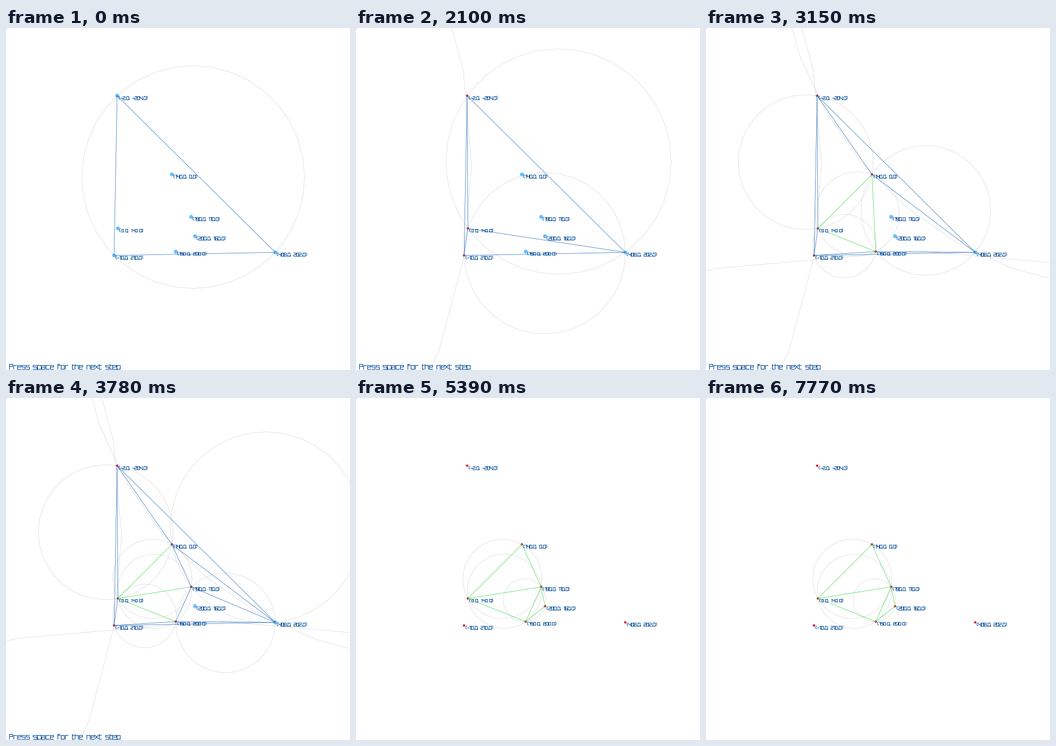
Write a matplotlib script that moves like this. It is 640 px wide and 636 px high and loops after 7840 ms.

```python
import numpy as np
import matplotlib.pyplot as plt
from matplotlib.animation import FuncAnimation
from matplotlib.collections import LineCollection

W, H, DPI = 640, 636, 100
PX = 72 / DPI                     # one pixel in points
FRAMES, STEP = 112, 70

SKY, RED = "#66bfff", "#e02434"
BLUE, GREEN, GRAY, INK = "#1a68ba", "#2cd83c", "#cccccc", "#004a98"

SCALE, ORIGIN = 0.7176, np.array([208.2, 272.3])
POINTS = {"A": (-2, -204), "B": (-10, 210), "C": (408, 202), "D": (0, 140),
          "E": (140, 0), "F": (150, 200), "G": (190, 110), "H": (200, 160)}
POS = {k: ORIGIN + SCALE * np.array(p) for k, p in POINTS.items()}

# Points are inserted from left to right; the last time drops the outer triangle.
ORDER = "BADEFGHC"
TIMES = [910, 1610, 2100, 2520, 3080, 3570, 4130, 4760, 5250]
FULL = "ABD ADE ACE BDF BCF DEG DFG CEG CGH CFH FGH"
MESHES = ["ABC", "ABC", "ABC",
          "ABD BCD ACD",
          "ABD BCD ADE CDE ACE",
          "ABD ADE ACE BDF BCF CEF DEF",
          "ABD ADE ACE BDF BCF DEG DFG CEG CFG",
          FULL, FULL,
          "DEG DFG FGH"]

# Segment font: strokes and advance of each character.
CAP, XH, GAP = 9, 6.4, 1.7
GLYPHS = {"0": ("abcdef", 7.7), "1": ("abc", 4.6), "2": ("abged", 7.7),
          "4": ("fgbc", 7.7), "5": ("afgcd", 7.7), "6": ("afgedc", 7.7),
          "8": ("abcdefg", 7.7), "9": ("abcdfg", 7.7), "-": ("g", 6.1),
          ".": ("k", 3.1), ",": ("q", 3.1), " ": ("", 6.1),
          "(": ("l", 4.6), ")": ("m", 4.6), "P": ("abgef", 8),
          "r": ("aef", 7), "e": ("abgfed", 8), "s": ("afgcd", 8),
          "p": ("abcdefj", 8), "a": ("abcdeg", 8), "c": ("afed", 8),
          "f": ("efuat", 6), "o": ("abcdef", 8), "t": ("efuad", 5.6),
          "h": ("abcefu", 8), "n": ("abcef", 8), "x": ("xy", 8)}


def strokes(w, h):
    m = h / 2
    return {"a": [(0, h), (w, h)], "b": [(w, h), (w, m)], "c": [(w, m), (w, 0)],
            "d": [(0, 0), (w, 0)], "e": [(0, 0), (0, m)], "f": [(0, m), (0, h)],
            "g": [(0, m), (w, m)], "u": [(0, h), (0, CAP)],
            "t": [(0, CAP), (w, CAP)], "j": [(0, 0), (0, -2)],
            "x": [(0, 0), (w, h)], "y": [(0, h), (w, 0)],
            "k": [(0.3, 0), (0.3, 0.9)], "q": [(0.5, 0.9), (0, -1.6)],
            "l": [(w * 0.7, h), (0, h * 0.8), (0, h * 0.2), (w * 0.7, 0)],
            "m": [(w * 0.3, h), (w, h * 0.8), (w, h * 0.2), (w * 0.3, 0)]}


def write(text, x, base, size):
    lines = []
    for ch in text:
        keys, adv = GLYPHS[ch]
        parts = strokes(adv - GAP, XH if ch.islower() else CAP)
        for k in keys:
            lines.append([(x + u * size, base - v * size) for u, v in parts[k]])
        x += adv * size
    return lines


def circle(tri):
    """Circumcircle as a 36-sided outline."""
    a, b, c = (POS[k] for k in tri)
    rhs = [b @ b - a @ a, c @ c - a @ a]
    mid = np.linalg.solve(2 * np.array([b - a, c - a]), rhs)
    t = np.radians(np.arange(0, 361, 10))
    return mid + np.hypot(*(a - mid)) * np.column_stack([np.cos(t), np.sin(t)])


def outline(mesh):
    """Each edge once, in the colour of the last triangle that holds it."""
    found = {}
    for tri in mesh:
        color = BLUE if set(tri) & set("ABC") else GREEN
        for edge in (tri[:2], tri[1:], tri[::2]):
            found[edge] = color
    return found


fig = plt.figure(figsize=(W / DPI, H / DPI), dpi=DPI, facecolor="white")
ax = fig.add_axes([0, 0, 1, 1])
ax.set_xlim(0, W)
ax.set_ylim(H, 0)
ax.axis("off")


def layer(lines, color, width, z):
    lc = LineCollection(lines, colors=color, linewidths=width * PX, zorder=z,
                        capstyle="projecting")
    return ax.add_collection(lc, autolim=False)


rings = layer([], GRAY, 0.55, 1)
edges = layer([], BLUE, 0.68, 3)
labels = []
for key, (px, py) in POINTS.items():
    x, y = POS[key]
    labels += write(f"({px:.1f}, {py:.1f})", x + 3.4, y + 6.6, 0.65)
layer(labels, INK, 0.95, 4)
prompt = layer(write("Press space for the next step", 6, 633.5, 0.985),
               INK, 1.1, 4)

spots = np.array([POS[k] for k in ORDER])
dots = ax.scatter(*spots.T, s=1, linewidths=0, zorder=2)
ax.scatter([0.5, W - 0.5] * 2, [0.5, 0.5, H - 0.5, H - 0.5], s=PX ** 2,
           marker="s", c="#a0a0a0", linewidths=0)


def draw(i):
    n = sum(i * STEP >= t for t in TIMES)
    mesh = MESHES[n].split()
    rings.set_segments([circle(t) for t in mesh])
    found = outline(mesh)
    edges.set_segments([[POS[k] for k in e] for e in found])
    edges.set_color(list(found.values()))
    done = np.arange(len(ORDER)) < n
    dots.set_sizes((np.where(done, 4.5, 7.2) * PX) ** 2)
    dots.set_facecolor([RED if d else SKY for d in done])
    prompt.set_visible(n < len(TIMES))
    return rings, edges, dots, prompt


anim = FuncAnimation(fig, draw, frames=FRAMES, interval=STEP, repeat=True,
                     repeat_delay=0, blit=False)
plt.show()
```
